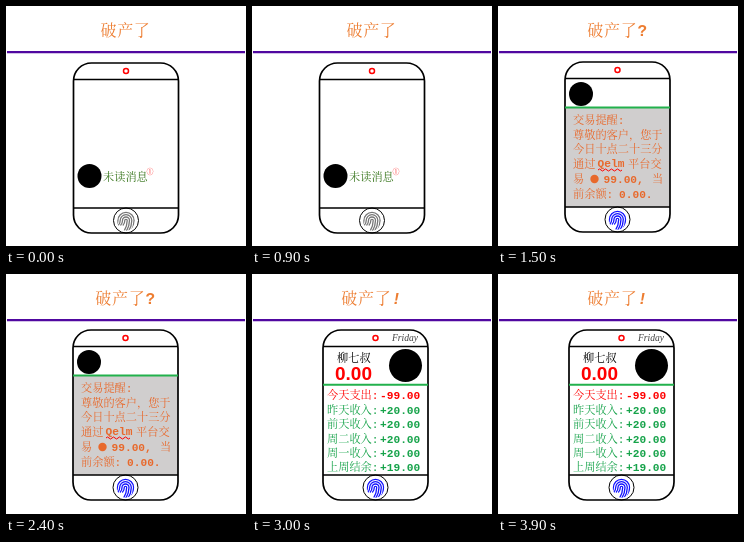
An HTML page that plays this animation: 240 by 240 pixels, repeating every 4.5 s.

```html
<!DOCTYPE html>
<html lang="zh">
<head>
<meta charset="utf-8">
<style>
  html, body { margin: 0; height: 100%; overflow: hidden; background: #fff; }
  svg { display: block; width: 100vw; height: 100vh; }
  text { font: 11.2px "Liberation Mono", "Noto Serif CJK SC", "Noto Sans CJK SC", "Noto Sans CJK", monospace; white-space: pre; }
  .title { font-size: 16px; font-weight: 500; letter-spacing: .7px; text-anchor: middle; fill: #ed7d31; }
  .num { font-weight: bold; font-size: 11.2px; }
  .scene { visibility: hidden; }
  .scene.on { visibility: visible; }
</style>
</head>
<body>
<svg viewBox="0 0 240 240">
  <defs>
    <g id="phone" fill="none" stroke="#000" stroke-width="1.7">
      <rect x="67.5" y="57" width="105" height="170" rx="18"/>
      <path d="M67.5 73.5H172.5M67.5 202H172.5"/>
      <circle cx="120" cy="65" r="2.5" stroke="#f00" stroke-width="1.5"/>
      <circle cx="120" cy="214.5" r="12.5" stroke-width="1"/>
    </g>
    <clipPath id="finger"><ellipse rx="9" ry="10.3"/></clipPath>
    <g id="print" fill="none" stroke-width="1.3" clip-path="url(#finger)"></g>
  </defs>
  <path d="M1 46.2H239" stroke="#5008a0" stroke-width="2.2"/>

  <g class="scene">
    <text class="title" x="119.5" y="30">破产了</text>
    <use href="#phone"/>
    <use href="#print" x="120" y="214.5" stroke="#777"/>
    <circle cx="83.5" cy="170" r="12"/>
    <text x="97" y="175" fill="#38761d">未读消息</text>
    <text x="140.5" y="168" fill="#f00" style="font-size:7px">①</text>
  </g>

  <g class="scene">
    <text class="title" x="119.5" y="30">破产了<tspan font-weight="bold">?</tspan></text>
    <path d="M67 102H172V201H67Z" fill="#d0cece"/>
    <use href="#phone" x="-.5" y="-1"/>
    <path d="M67 101.5H172" stroke="#22b14c" stroke-width="2"/>
    <use href="#print" x="119.5" y="213.5" stroke="#1414ff"/>
    <circle cx="83" cy="88" r="12"/>
    <g fill="#e8692c">
      <text x="75" y="117.5">交易提醒:</text>
      <text x="75" y="132.5">尊敬的客户，您于</text>
      <text x="75" y="147">今日十点二十三分</text>
      <text x="75" y="162">通过</text>
      <text class="num" x="99.5" y="161">Qelm</text>
      <text x="130" y="162">平台交</text>
      <text x="75" y="177">易</text>
      <circle cx="96.5" cy="173" r="4.2"/>
      <text class="num" x="105.5" y="177">99.00,</text>
      <text x="154" y="177">当</text>
      <text x="75" y="192">前余额:</text>
      <text class="num" x="121" y="192">0.00.</text>
    </g>
    <path d="M100 164q1.5-2 3 0t3 0 3 0 3 0 3 0 3 0 3 0 3 0" fill="none" stroke="#f00"/>
  </g>

  <g class="scene">
    <text class="title" x="119.5" y="30">破产了<tspan font-style="italic" font-weight="bold">!</tspan></text>
    <use href="#phone" x="3.5" y="-1"/>
    <path d="M71 110.8H176" stroke="#22b14c" stroke-width="2"/>
    <use href="#print" x="123.5" y="213.5" stroke="#1414ff"/>
    <circle cx="153.5" cy="91.5" r="16.5"/>
    <text x="140" y="67" fill="#444" style="font:italic 9.6px 'Liberation Serif',serif">Friday</text>
    <text x="85" y="88" font-weight="500">柳七叔</text>
    <text x="83" y="106" fill="#f00" style="font:bold 19px 'Liberation Sans',sans-serif">0.00</text>
    <g id="ledger"></g>
  </g>
</svg>
<script>
  const $ = id => document.getElementById(id);

  // Nested arches with legs sweeping down to the left
  $('print').innerHTML = [1.2, 3.5, 5.8, 8.1].map(r =>
    `<path d="M${-r - 2} 5Q${-r} 3 ${-r} 0a${r} ${r} 0 0 1 ${2 * r} 0q0 6 -4 12"/>`).join('');

  const entries = [
    ['今天支出', '-99.00'], ['昨天收入', '+20.00'], ['前天收入', '+20.00'],
    ['周二收入', '+20.00'], ['周一收入', '+20.00'], ['上周结余', '+19.00'],
  ];
  $('ledger').innerHTML = entries.map(([label, amount], i) => {
    const y = 125.3 + i * 14.4, color = i ? '#16a34a' : '#f00';
    return `<text x="75" y="${y}" fill="${color}">${label}:</text>` +
      `<text class="num" x="128" y="${y}" fill="${color}">${amount}</text>`;
  }).join('');

  const scenes = document.querySelectorAll('.scene');
  function draw() {
    const current = Math.floor(performance.now() % 4500 / 1500);
    scenes.forEach((scene, i) => scene.classList.toggle('on', i === current));
    requestAnimationFrame(draw);
  }
  draw();
</script>
</body>
</html>
```
